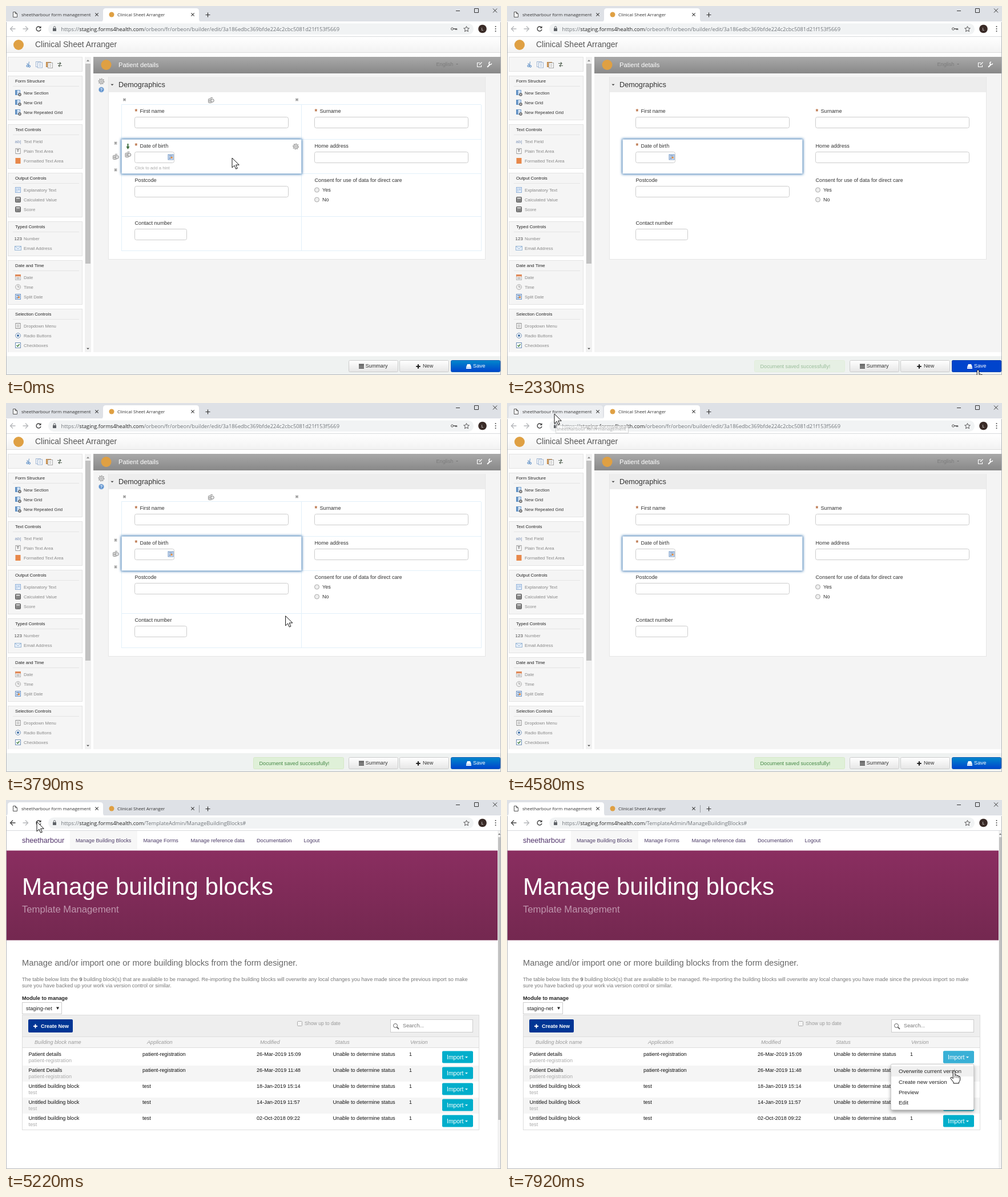
These frames come from a looping animation (867 by 646 pixels, 8 s). An HTML page:

```html
<!DOCTYPE html>
<html lang="en">
<head>
<meta charset="utf-8">
<title>Form builder walkthrough</title>
<style>
html, body { margin: 0; width: 100%; height: 100%; overflow: hidden; background: #fff; }
svg { display: block; width: 867px; height: 646px; }
text { font-family: "Liberation Sans", Arial, sans-serif; white-space: pre; }
.ui { font-family: "Open Sans", "Noto Sans", sans-serif; }
.i { font-style: italic; }
.b { font-weight: bold; }
</style>
</head>
<body>
<svg id="stage" viewBox="0 0 867 646" xmlns="http://www.w3.org/2000/svg"></svg>
<script>
const LOOP = 8000;
const BRAND = 'sheetharbour', TOOL = 'Clinical Sheet Arranger';

// Drawing helpers; text is placed by the middle of its capitals.
const text = (x, y, s, size = 9.15, fill = '#333', cls = '') =>
  `<text x="${x}" y="${y + size * .35}" font-size="${size}" fill="${fill}" class="${cls}">${s}</text>`;
const rect = (x, y, w, h, fill, stroke = 'none', rx = 0, extra = '') =>
  `<rect x="${x}" y="${y}" width="${w}" height="${h}" fill="${fill}" stroke="${stroke}" rx="${rx}" ${extra}/>`;
const path = (d, stroke = '#555', w = 1, fill = 'none') =>
  `<path d="${d}" stroke="${stroke}" stroke-width="${w}" fill="${fill}"/>`;
const shape = (d, fill) => path(d, 'none', 0, fill);
const disc = (x, y, r, fill, stroke = 'none') =>
  `<circle cx="${x}" cy="${y}" r="${r}" fill="${fill}" stroke="${stroke}"/>`;
const group = (id, body) => `<g id="${id}">${body}</g>`;
const fade = (id, a, b) => `<linearGradient id="${id}" x2="0" y2="1">
  <stop stop-color="${a}"/><stop offset="1" stop-color="${b}"/></linearGradient>`;
const caret = (x, y, r, fill) => shape(`M${x - r} ${y - r / 2}h${2 * r}l${-r} ${r}z`, fill);
const plus = (x, y, r, col, w) => path(`M${x - r} ${y}h${2 * r}M${x} ${y - r}v${2 * r}`, col, w);
const cross = (x, y, r) => path(`M${x - r} ${y - r}l${2 * r} ${2 * r}m0 ${-2 * r}l${-2 * r} ${2 * r}`, '#444', 1.1);
const gear = (x, y) => `<circle cx="${x}" cy="${y}" r="4.5" fill="none" stroke="#a0a0a0" stroke-width="2" stroke-dasharray="1.9 1.5"/>`
  + disc(x, y, 3.5, '#e2e2e2', '#a0a0a0') + disc(x, y, 1.3, '#fff', '#a0a0a0');
const bin = (x, y) => rect(x - 4.5, y - 2.5, 6, 7, '#eee', '#888', 1)
  + path(`M${x - 1} ${y - 4.5}h4M${x - 2.5} ${y - 1}v4M${x - .5} ${y - 1}v4`, '#888') + disc(x + 2.5, y + .5, 2.8, '#e6e6e6', '#888');
const sheet = (x, y, col = '#8a8a8a') => rect(x - 4, y - 4.5, 8, 9, '#fff', col)
  + path(`M${x - 2} ${y - 2}h4m-4 2h4m-4 2h4`, col, .8);
const calendar = (x, y) => rect(x - 4.5, y - 4.5, 9, 9, '#fff', '#b5b5b5')
  + rect(x - 5, y - 5, 10, 3.5, '#e08a5a') + path(`M${x - 3} ${y + .5}h6m-6 2h6`, '#999');
const dateButton = (x, y) => rect(x - 4.5, y - 4.5, 9, 9, '#e3edfa', '#6d93c4')
  + rect(x - 3, y - 3, 6, 2, '#7f9cc4') + rect(x, y - .5, 3, 3, '#e0893a') + rect(x - 3, y + .5, 3, 2.5, '#7f9cc4');
const calc = (x, y) => rect(x - 4.5, y - 4.5, 9, 9, '#666', '#555', 1) + rect(x - 3.5, y - 3.5, 7, 2, '#eee')
  + path(`M${x - 3.5} ${y + .5}h7m-7 2.5h7`, '#e4e4e4', 1.2) + path(`M${x - 1} ${y - 1}v5m2.5-5v5`, '#666');
const grid = (x, y) => rect(x - 4.5, y - 4.5, 8, 8, '#e6f0fb', '#6c9aca') + rect(x - 4.5, y - 4.5, 3, 8, '#5f8fc2')
  + path(`M${x - 1} ${y - 1.5}h4.5M${x - 1} ${y + 1}h3`, '#a9c4e4') + disc(x + 3, y + 3, 2.7, '#555') + plus(x + 3, y + 3, 1.5, '#fff', .9);

const icons = {
  grid, sheet, calc,
  field: (x, y) => text(x - 5.5, y, 'ab|', 8, '#7d93b8'),
  plain: (x, y) => rect(x - 4, y - 4.5, 8, 9, '#fff', '#999') + text(x - 2.2, y, 'T', 7, '#555', 'b'),
  rich: (x, y) => rect(x - 4.5, y - 5, 9, 10, '#e8884a'),
  note: (x, y) => rect(x - 4.5, y - 4.5, 9, 9, '#e6effa', '#8fb0d8') + path(`M${x - 2} ${y - 3}v6m2-5h3m-3 2h3`, '#8fb0d8'),
  number: (x, y) => text(x - 6.5, y, '123', 8, '#444'),
  mail: (x, y) => rect(x - 5.5, y - 3.5, 11, 7, '#eaf2fb', '#9bb8d6') + path(`M${x - 5} ${y - 3}l5 4l5-4`, '#9bb8d6'),
  date: calendar,
  time: (x, y) => disc(x, y, 4.5, '#eee', '#b0b0b0') + path(`M${x} ${y - 3}v3h2.5`, '#999'),
  split: dateButton,
  radio: (x, y) => disc(x, y, 4.3, '#fff', '#6e8fb5') + disc(x, y, 2, '#3f6ea5'),
  check: (x, y) => rect(x - 4.5, y - 4.5, 9, 9, '#fff', '#6e8fb5') + path(`M${x - 2.5} ${y}l2 2l3-4`, '#3a7a3a', 1.4)
};

function tabs(active) {
  const tab = (a, b, fill) => shape(`M${a - 5} 28Q${a} 28 ${a} 23V9Q${a} 4 ${a + 5} 4H${b - 5}Q${b} 4 ${b} 9V23Q${b} 28 ${b + 5} 28z`, fill);
  return (active ? group('tabHover', tab(3, 168, '#eceef1')) + tab(170, 338, '#fff') : tab(3, 170, '#fff'))
    + path('M12.5 10.5h4l3 3v6h-7zM16.5 10.5v3h3', '#555', 1, '#fff')
    + text(27, 15, BRAND + ' form management', 7.9, '#333', 'ui') + cross(159, 15, 2.7)
    + disc(185, 15, 4.5, '#dfa043') + text(195, 15, TOOL, 7.9, '#333', 'ui') + cross(327, 15, 2.7)
    + (active ? '' : path('M338.5 9v13', '#9a9da2')) + plus(353.5, 15.5, 4, '#333', 1.2);
}

function toolbar(rest, back) {
  const arrow = (x, d, col) => path(`M${x - 4.5 * d} 40h${9 * d}M${x} 35.5l${4.5 * d} 4.5l${-4.5 * d} 4.5`, col, 1.3);
  return rect(0, 27, 867, 26, '#fff') + rect(74, 30.5, 745, 19.5, '#f1f3f4', 'none', 9.7)
    + arrow(12, -1, back) + arrow(34, 1, '#b5b7ba')
    + path('M60 37.2A4 4 0 1 0 61 41', '#444', 1.4) + shape('M61.5 35v4h-4z', '#444')
    + rect(82, 39, 6, 5, '#5f6368') + path('M83.3 39v-1.5a1.7 1.7 0 0 1 3.4 0v1.5', '#5f6368')
    + `<text x="96.5" y="43.5" font-size="9.3" class="ui" fill="#70757a">https://<tspan fill="#222">staging.forms4health.com</tspan>${rest}</text>`
    + path('M806.5 35.5l1.4 3.2l3.4.3l-2.6 2.3l.8 3.4l-3-1.8l-3 1.8l.8-3.4l-2.6-2.3l3.4-.3z', '#555')
    + disc(834.5, 40, 7.3, '#3a2b27') + text(832.5, 40, 'L', 7.5, '#eee', 'ui')
    + [36, 40, 44].map(y => disc(857.5, y, 1, '#444')).join('') + path('M0 53.5H867', '#d8dadd');
}

function sidebar() {
  const panels = [
    [123, 'Form Structure', 'grid:New Section', 'grid:New Grid', 'grid:New Repeated Grid'],
    [208, 'Text Controls', 'field:Text Field', 'plain:Plain Text Area', 'rich:Formatted Text Area'],
    [293, 'Output Controls', 'note:Explanatory Text', 'calc:Calculated Value', 'calc:Score'],
    [378, 'Typed Controls', 'number:Number', 'mail:Email Address'],
    [446, 'Date and Time', 'date:Date', 'time:Time', 'split:Split Date'],
    [531, 'Selection Controls', 'sheet:Dropdown Menu', 'radio:Radio Buttons', 'check:Checkboxes']
  ];
  let out = rect(3.5, 89.5, 130, 25, '#f5f5f5', '#e3e3e3')
    + path('M40.5 97.5l-1 6M36.5 100.5l4 3', '#7aa0cc', 1.2) + disc(37.5, 105, 1.6, 'none', '#3f7cc0') + disc(41, 105.5, 1.6, 'none', '#3f7cc0')
    + sheet(56.5, 102, '#9db4d2') + sheet(59.5, 103.5, '#9db4d2')
    + rect(70.5, 98.5, 8, 8, '#d9a566', '#b98246') + sheet(77.5, 104, '#a5a5a5')
    + path('M90 100.5h6m-2-2l2 2l-2 2M98 104.5h-6m2-2l-2 2l2 2', '#5d6b5d', 1.2);
  panels.forEach(([y, title, ...items], p) => {
    out += rect(3.5, y - .5, 130, items.length * 17 + 26, '#f5f5f5', '#e3e3e3')
      + text(16, y + 8.5, title, 7.8, '#222') + path(`M12 ${y + 17.5}H128`, '#e4e4e4');
    items.forEach((item, k) => {
      const [icon, label] = item.split(':'), cy = y + 29 + k * 17;
      out += icons[icon](21, cy) + text(31, cy, label, 7.75, p ? '#888' : '#333');
    });
  });
  return out + rect(0, 606, 152, 7, '#fff') + rect(138, 89, 11, 517, '#f1f1f1') + rect(139, 101, 9, 350, '#c1c1c1')
    + shape('M141 97h5l-2.5-3z', '#888') + caret(143.5, 600, 2.5, '#555');
}

function form() {
  const input = (x, y, w) => rect(x + .5, y + .5, w, 19, '#fff', '#ccc', 3);
  const must = (x, y, s) => text(x, y + .5, '*', 12, '#b5683a', 'b') + text(x + 9, y, s);
  const radio = (y, s) => disc(544.5, y, 4, '#eee', '#aaa') + text(554, y, s);
  const lines = [173, 234, 294, 369, 429].map(y => `M202 ${y - .5}H832`).join('') + 'M202.5 173V429M517.5 173V429M832.5 173V429';
  const bars = (x, y) => path(`M${x - 2.5} ${y - 1.5}h5m-4 1.5h3m-4 1.5h5`, '#666', .9);
  const ends = x => path(`M${x - 2} 161.5v5m1.5-4v3m1.5-4v5`, '#666', .9);
  return rect(153, 89, 713, 517, '#f4f4f4') + rect(153, 89, 713, 29, 'url(#bar)')
    + disc(175.5, 103, 9, '#dfa043') + text(197, 103, 'Patient details', 11.2, '#fff')
    + text(753.5, 102, 'English', 9.15, '#7b7b7b') + caret(790, 102, 2, '#7b7b7b')
    + path('M830 99.5h-4.5v7h7v-3M829 103l4.5-4.5', '#fff', 1.1)
    + path('M843 107l4.5-4.5', '#fff', 2) + path('M850.5 100.5a2.3 2.3 0 1 1-2.5-2.5', '#fff', 1.5)
    + rect(179.5, 124.5, 660, 319, '#fff', '#e6e6e6') + rect(180, 124, 659, 27, '#ededed')
    + caret(186, 138, 2.6, '#444') + text(197, 137.5, 'Demographics', 12.7, '#333')
    + group('hoverGrid', path(lines, '#e2f0fa') + gear(167, 132) + disc(167, 146.5, 4.6, '#5f93cf', '#bcd0e8')
      + text(164.8, 146.5, '?', 7.5, '#fff', 'b') + ends(208) + ends(510) + bin(359, 165)
      + bars(192, 240) + bin(192, 264) + bars(192, 287))
    + rect(201.5, 232.5, 317, 62, '#2a6cab', 'none', 1, 'filter="url(#glow)"') + rect(202.5, 233.5, 315, 60, '#fff')
    + must(225.5, 184, 'First name') + input(225, 194, 269) + must(540.5, 184, 'Surname') + input(540, 194, 269)
    + must(225.5, 244.5, 'Date of birth') + input(225, 255, 69) + dateButton(288.5, 264.5)
    + text(540.5, 244.5, 'Home address') + input(540, 255, 269)
    + text(225.5, 305, 'Postcode') + input(225, 315, 269)
    + text(540.5, 305, 'Consent for use of data for direct care') + radio(322, 'Yes') + radio(339, 'No')
    + text(225.5, 380, 'Contact number') + input(225, 390, 91)
    + group('hoverCell', path('M213.5 241v7', '#3b6b3b', 2) + shape('M210.5 246h6l-3 5z', '#3b6b3b')
      + bin(213.5, 260) + gear(507.5, 246) + text(225.5, 283, 'Click to add a hint', 7.7, '#aaa'));
}

function designer() {
  const button = (x, fill, stroke) => rect(x + .5, 620.5, 86, 20, fill, stroke, 2);
  return rect(0, 28, 867, 618, '#fff') + tabs(true)
    + toolbar('/orbeon/fr/orbeon/builder/edit/3a186edbc369bfde224c2cbc5081d21f153f5669', '#b5b7ba')
    + disc(781.5, 40, 2, 'none', '#555') + path('M783.5 40h6v2m-2-2v2', '#555', 1.3)
    + rect(0, 54, 867, 28, 'url(#head)') + path('M0 81.5H867', '#dcdcdc')
    + disc(22, 68, 9, '#dfa043') + text(51, 67.5, TOOL, 14, '#555')
    + sidebar() + form() + rect(0, 613, 867, 32, '#eff2f1')
    + group('saved', rect(433.5, 620.5, 158, 20, '#dff0d8', '#d6e9c6', 2) + text(443.5, 631, 'Document saved successfully!', 9.15, '#468847'))
    + button(600, 'url(#btn)', '#ccc') + path('M618 627.5h9m-9 2.2h9m-9 2.2h9m-9 2.2h9', '#222', 1.3) + text(629.5, 630, 'Summary')
    + button(689, 'url(#btn)', '#ccc') + plus(722, 631, 3.7, '#222', 2.2) + text(730, 630, 'New')
    + button(779, 'url(#blue)', '#0a58b5') + group('saveHover', button(779, '#04c', '#0440b0')) + group('savePress', button(779, '#003cb0', '#033390'))
    + shape('M808 627h5l2 5h-9z', '#fff') + rect(806, 632.5, 9, 2.5, '#fff') + text(818, 630, 'Save', 9.4, '#fff');
}

function admin() {
  const menu = [[122, 'Manage Building Blocks'], [240.5, 'Manage Forms'], [323.5, 'Manage reference data'], [439, 'Documentation'], [521.5, 'Logout']];
  const heads = [[50, 'Building block name'], [247, 'Application'], [445, 'Modified'], [576, 'Status'], [708, 'Version']];
  const rows = [
    ['Patient details', 'patient-registration', '26-Mar-2019 15:09'], ['Patient Details', 'patient-registration', '26-Mar-2019 11:48'],
    ['Untitled building block', 'test', '18-Jan-2019 15:14'], ['Untitled building block', 'test', '14-Jan-2019 11:57'],
    ['Untitled building block', 'test', '02-Oct-2018 09:22']
  ];
  const importButton = (y, fill) => rect(764, y - 10.5, 54, 21, fill, 'none', 2)
    + text(772, y, 'Import', 10.4, '#fff') + caret(806.5, y + .5, 2.5, '#fff');
  return rect(0, 28, 867, 618, '#fff') + tabs(false) + toolbar('/TemplateAdmin/ManageBuildingBlocks#', '#444')
    + rect(112, 54, 118, 34, '#f7f7f7') + text(28, 71, BRAND, 12.6, '#52356b')
    + menu.map(([x, s]) => text(x, 70.5, s, 9.15, '#4b3a66')).join('')
    + rect(0, 88.5, 861, 157, 'url(#hero)') + text(28, 151.5, 'Manage building blocks', 42.1, '#fff')
    + text(28, 191.5, 'Template Management', 16.7, '#c096ae')
    + text(28, 284.5, 'Manage and/or import one or more building blocks from the form designer.', 14.7, '#666')
    + text(28, 313.5, 'The table below lists the <tspan fill="#333">9</tspan> building block(s) that are available to be managed. Re-importing the building blocks will overwrite any local changes you have made since the previous import so make', 9.14, '#777')
    + text(28, 324.5, 'sure you have backed up your work via version control or similar.', 9.14, '#777')
    + text(28, 346.5, 'Module to manage', 9.12, '#222', 'b')
    + rect(28.5, 354.5, 69, 20, '#fff', '#ccc') + text(35, 365, 'staging-net', 9.25, '#222') + shape('M88 362.5h5l-2.5 4.5z', '#222')
    + rect(28.5, 376.5, 800, 201, '#fff', '#ddd') + rect(29, 377, 799, 37, '#eee') + rect(29, 415, 799, 18, '#f5f5f5')
    + path('M29 414.5h799M29 433.5h799', '#ddd')
    + rect(39, 384, 78, 23, '#003594', 'none', 2) + plus(51.5, 396, 3.5, '#fff', 2) + text(61, 395.5, 'Create New', 9, '#fff', 'b')
    + rect(510.5, 387.5, 8, 8, '#f4f4f4', '#aaa', 1) + text(523, 390.5, 'Show up to date', 8.7, '#999')
    + rect(673.5, 384.5, 144, 22, '#fff', '#ccc') + disc(682, 395, 3.5, 'none', '#666') + path('M684.5 397.5l3.5 3.5', '#666', 1.8)
    + text(695, 395, 'Search...', 9.25, '#777')
    + heads.map(([x, s]) => text(x, 424, s, 9.15, '#999', 'i')).join('')
    + rows.map(([name, app, date], k) => {
      const y = 445 + 28 * k;
      return (k % 2 ? rect(29, y - 8, 799, 28, '#f5f5f5') : '') + text(39.5, y, name, 9.15, '#111')
        + text(39.5, y + 11, app, 9.15, '#aaa') + text(239, y, app, 9.15, '#111') + text(439, y, date, 9.15, '#111')
        + text(572.5, y, 'Unable to determine status', 9.15, '#111') + text(706, y, '1', 9.15, '#111') + importButton(y + 5, '#00aecb');
    }).join('')
    + group('importHover', importButton(450, '#39b0d6'))
    + group('menu', rect(672.5, 462.5, 145, 80, '#000', 'none', 2, 'opacity=".4" filter="url(#shade)"')
      + rect(672.5, 462.5, 145, 80, '#fff', '#ccc', 2) + group('menuHover', rect(673, 466, 144, 18, '#f0f0f0'))
      + ['Overwrite current version', 'Create new version', 'Preview', 'Edit'].map((s, k) => text(686, 475 + 18.2 * k, s, 9.85, '#222')).join(''))
    + rect(861, 54, 6, 592, '#f1f1f1') + rect(862, 65, 5, 495, '#c1c1c1') + shape('M862 61h4l-2-3z', '#777')
    + group('status', rect(-1, 640.5, 144.5, 9, '#dee1e6', '#c4c7cb', 2));
}

const stage = document.getElementById('stage');
stage.innerHTML = `<defs>${fade('bar', '#a9a9a9', '#888')}${fade('head', '#fff', '#f2f2f2')}${fade('btn', '#fff', '#e6e6e6')}
  ${fade('blue', '#0088cc', '#0044cc')}${fade('hero', '#8a2e60', '#742850')}
  <filter id="glow" x="-10%" y="-30%" width="120%" height="160%"><feGaussianBlur stdDeviation="2.3"/></filter>
  <filter id="shade" x="-10%" y="-10%" width="120%" height="130%"><feOffset dy="3"/><feGaussianBlur stdDeviation="3"/></filter></defs>`
  + rect(0, 0, 867, 28, '#dee1e6') + group('designer', designer()) + group('admin', admin())
  + path('M788 8.5h7M820.5 4.5h7v7h-7zM853 4.5l7 7m0-7l-7 7', '#333')
  + path('M.5 28V645.5H866.5V28', '#b4b7bb')
  + group('tip', rect(85.5, 39.5, 127, 13, '#fff', '#bbb') + text(87, 45.5, BRAND + ' form management', 7.9, '#777', 'ui'))
  + group('arrow', path('M0 0V17L4 13.2L6.7 19.3L9.3 18.2L6.6 12.2H12.3Z', '#111', 1, '#fff'))
  + group('hand', path('M-1.7 1.7Q-1.7 0 0 0Q1.7 0 1.7 1.7V7.5Q5 6.6 5 8.6Q8 7.8 8 9.8Q10.6 9.2 10.6 11.5V16Q10 18.5 8.5 20V22H-1V20L-6 13.5Q-6.5 11 -4 11.6L-1.7 13.6Z', '#111', 1, '#fff')
    + path('M1.7 8v4M5 9v3.5M8 10v3', '#111', .8));

const el = {};
stage.querySelectorAll('g[id]').forEach(g => el[g.id] = g);
const show = (id, on) => el[id].style.display = on ? '' : 'none';
const inside = (p, x0, y0, x1, y1) => p.x >= x0 && p.x <= x1 && p.y >= y0 && p.y <= y1;

// Pointer moves: start, end, steps, target and an optional bend.
const START = { x: 396, y: 266 };
const moves = [
  [300, 1000, 10, 825, 637], [3420, 3420, 1, 711, 566], [3520, 4190, 10, 82, 17], [4260, 4440, 3, 83, 19],
  [4660, 4910, 4, 54, 38], [6150, 6920, 11, 596, 390, 469, 212], [7000, 7380, 6, 786, 452], [7840, 7920, 2, 783, 474]
];

function pointer(t) {
  let p = START;
  for (const [t0, t1, n, x, y, bx = (p.x + x) / 2, by = (p.y + y) / 2] of moves) {
    if (t < t0) break;
    const k = t >= t1 ? n : Math.floor((t - t0) / (t1 - t0) * (n - 1) + 1e-6) + 1;
    const u = k / n, s = u * u * (3 - 2 * u);
    const bend = (a, b, c) => (1 - s) * (1 - s) * a + 2 * s * (1 - s) * b + s * s * c;
    p = { x: bend(p.x, bx, x), y: bend(p.y, by, y) };
  }
  return p;
}

function draw(t) {
  const p = pointer(t), home = t < 4740, open = t >= 7530;
  const onSave = home && inside(p, 779, 620, 866, 646);
  const onImport = !home && inside(p, 764, 439, 818, 461);
  const onItem = open && inside(p, 673, 463, 818, 543);
  show('designer', home);
  show('admin', !home);
  show('tabHover', inside(p, 3, 4, 168, 28));
  show('hoverGrid', inside(p, 180, 124, 840, 443));
  show('hoverCell', inside(p, 202, 233, 518, 294));
  show('saveHover', onSave);
  show('savePress', t >= 1940 && t < 2190);
  el.saved.style.opacity = t < 2330 ? 0 : t < 2410 ? .5 : 1;
  el.tip.style.opacity = t < 4580 || !home ? 0 : t < 4660 ? .6 : 1;
  el.status.style.opacity = t < 4830 || t >= 5220 ? 0 : t < 5060 ? 1 : t < 5140 ? .66 : .33;
  show('importHover', onImport || open);
  show('menu', open);
  show('menuHover', onItem);
  const hand = onSave || onImport || onItem;
  show('hand', hand);
  show('arrow', !hand);
  el[hand ? 'hand' : 'arrow'].setAttribute('transform', `translate(${p.x.toFixed(1)} ${p.y.toFixed(1)})`);
}

const begin = performance.now();
function tick() {
  draw((performance.now() - begin) % LOOP);
  requestAnimationFrame(tick);
}
tick();
</script>
</body>
</html>
```
